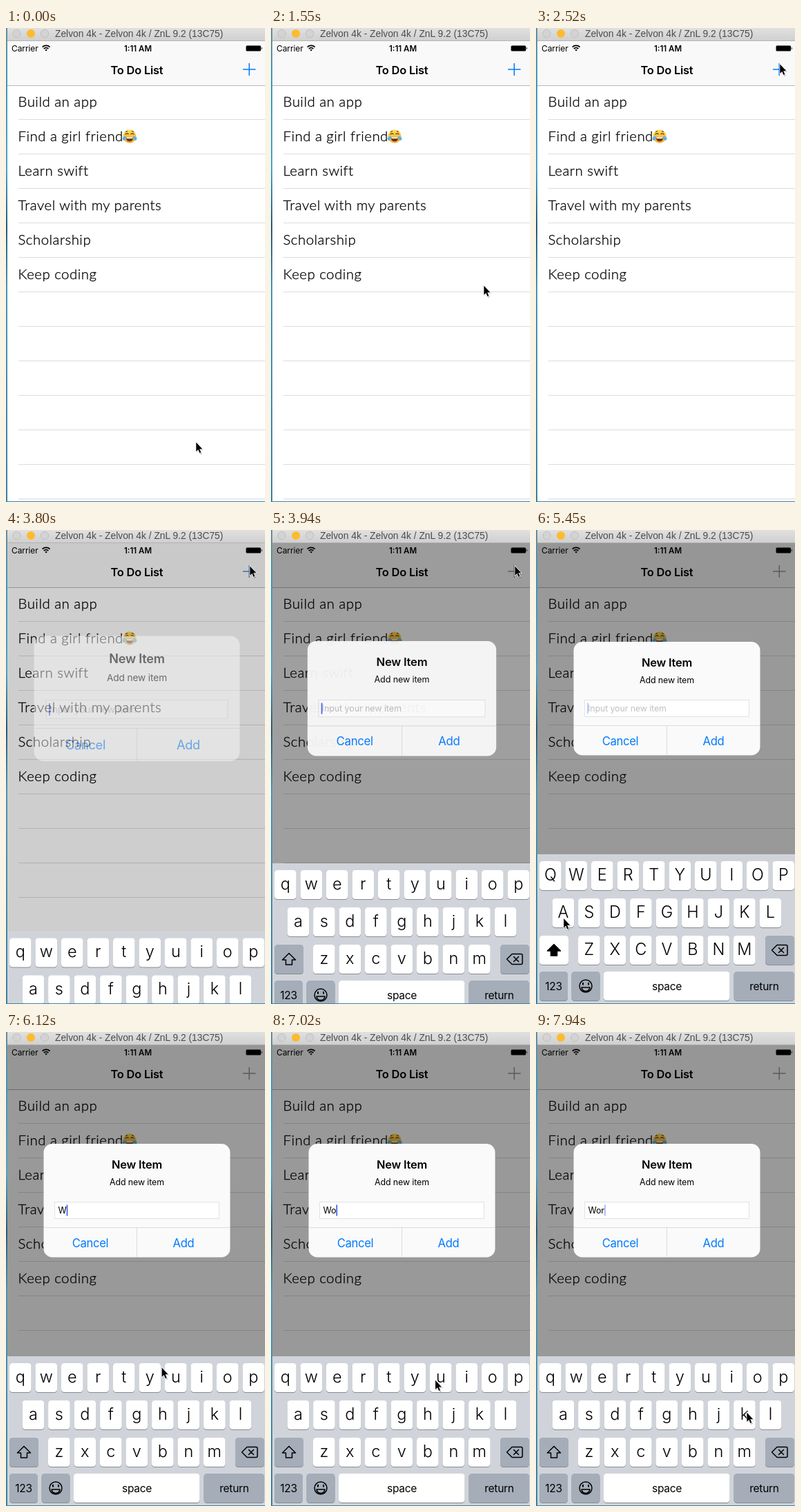
Recreate the animation shown at these times as an HTML page. Size 375x687 px, loop 8000 ms.

```html
<!DOCTYPE html>
<html lang="en">
<head>
<meta charset="utf-8">
<title>To Do List</title>
<style>
html, body { margin: 0; width: 100%; height: 100%; overflow: hidden; background: #fff; }
svg { display: block; width: 375px; height: 687px; }
text { font-family: Inter, "Liberation Sans", sans-serif; white-space: pre; }
.mid { text-anchor: middle; }
.bar { font: 13.8px "Liberation Sans", Arial, sans-serif; fill: #4c4c4c; }
.row { font: 300 20.4px Lato, sans-serif; letter-spacing: .5px; stroke: #000; stroke-width: .3px; }
.head { font-size: 16.4px; font-weight: 600; letter-spacing: -.2px; }
.small { font-size: 12.4px; letter-spacing: -.1px; }
.btn { font-size: 16.6px; letter-spacing: -.3px; fill: #007aff; }
.key { font-size: 23.5px; font-weight: 300; }
.fn { font-size: 15.5px; letter-spacing: -.3px; }
.line { fill: none; stroke: #000; stroke-width: 1.5; stroke-linejoin: round; stroke-linecap: round; }
</style>
</head>
<body>
<svg id="stage" viewBox="0 0 375 687">
  <defs>
    <linearGradient id="sea" x1="0" y1="0" x2="0" y2="1">
      <stop offset="0" stop-color="#6d8b9e"/><stop offset=".12" stop-color="#3f9cba"/>
      <stop offset=".3" stop-color="#4aa6c4"/><stop offset=".42" stop-color="#2c5d76"/>
      <stop offset=".55" stop-color="#4b98b2"/><stop offset="1" stop-color="#3f83a0"/>
    </linearGradient>
    <linearGradient id="chrome" x1="0" y1="0" x2="0" y2="1">
      <stop offset="0" stop-color="#e0e0e0"/><stop offset="1" stop-color="#cfcfcf"/>
    </linearGradient>
    <linearGradient id="face" x1="0" y1="0" x2="0" y2="1">
      <stop offset="0" stop-color="#ffdf55"/><stop offset="1" stop-color="#f2a62c"/>
    </linearGradient>
    <clipPath id="screen"><rect x="2" y="19" width="373" height="667"/></clipPath>
  </defs>
  <rect width="375" height="687" fill="url(#sea)"/>
  <rect x="2" width="373" height="19" fill="url(#chrome)"/>
  <rect x="2" y="18" width="373" height="1" fill="#b4b4b4"/>
  <g stroke="#bfbfbf" fill="#d3d3d3"><circle cx="15.500" cy="8" r="5.700"/><circle cx="56" cy="8" r="5.700"/></g>
  <circle cx="36" cy="8" r="6" fill="#fdbb2d"/>
  <text class="bar" x="71" y="13">Zelvon 4k - Zelvon 4k / ZnL 9.2 (13C75)</text>

  <g clip-path="url(#screen)">
    <rect x="2" y="19" width="373" height="667" fill="#fff"/>
    <rect x="2" y="19" width="373" height="64" fill="#f9f9f9"/>
    <rect x="2" y="83" width="373" height="1" fill="#b9b9bb"/>
    <text class="small" x="8" y="33.500" style="font-size:12px">Carrier</text>
    <g fill="none" stroke="#000" stroke-width="1.700">
      <path d="M52.600 27.600a8 8 0 0 1 11 0M54.800 30a5 5 0 0 1 6.600 0"/>
      <path d="M56.300 31.700a2.800 2.800 0 0 1 3.600 0L58.100 33.600z" fill="#000" stroke="none"/>
    </g>
    <text class="mid" x="191" y="33.500" style="font-size:11.500px;font-weight:600">1:11 AM</text>
    <rect x="347.500" y="25.500" width="21.500" height="8" rx="1.500"/>
    <path d="M369.800 27.500q2 2 0 4z"/>
    <text class="head mid" x="189.500" y="67">To Do List</text>
    <path id="plus" d="M343 60h18.500M352.200 51v18" stroke-width="1.500"/>
    <g id="rows"></g>
    <g transform="translate(179 157)">
      <circle r="9.700" fill="url(#face)"/>
      <path d="M-5.500 1h11q-.5 6.500-5.500 6.500t-5.500-6.500z" fill="#6b3410"/>
      <path d="M-4.900 1.300h9.800l-.5 2h-8.800z" fill="#fff"/>
      <path d="M-6.500-2.500q2.500-3 5-.5M6.500-2.500q-2.500-3-5-.5M-6-6.500l3-1M6-6.500l-3-1" fill="none" stroke="#6b3410" stroke-width="1.100"/>
      <path d="M-5.500-.5q-5.500 1-5 4.500 1.500 3.500 4 1 1.500-2 1-5.500zM5.500-.5q5.500 1 5 4.500-1.500 3.500-4 1-1.500-2-1-5.500z" fill="#58b4ea"/>
    </g>
    <rect id="dim" x="2" y="19" width="373" height="667"/>

    <g id="alert">
      <rect x="54.500" y="162" width="270" height="164.500" rx="12.500" fill="#fafafa"/>
      <text class="head mid" x="189.500" y="198">New Item</text>
      <text class="small mid" x="189.500" y="221.500">Add new item</text>
      <rect x="70.500" y="246.500" width="238" height="24" fill="#fff" stroke="#e2e2e2"/>
      <text id="hint" class="small" x="75" y="263" fill="#c0c0c5">Input your new item</text>
      <text id="typed" class="small" x="75.500" y="263"></text>
      <rect id="caret" y="250.500" width="1.800" height="16" fill="#4668e8"/>
      <path d="M54.500 283.500h270M189.500 283.500v43" stroke="#dcdcde"/>
      <text class="btn mid" x="122" y="311.500">Cancel</text>
      <text class="btn mid" x="257" y="311.500">Add</text>
    </g>

    <g id="board"></g>
  </g>
  <g id="mouse">
    <path d="M1 2V15L4 12.500 6.500 18 9 17 6.500 11.500H11.500z" opacity=".25"/>
    <path d="M.3.500V13.800L3.300 11 5.400 15.900 7.300 15.100 5.200 10.200H9.300z" stroke="#fff" stroke-width="1.400" paint-order="stroke"/>
  </g>
</svg>
<script>
const LOOP = 8000;
const $ = id => document.getElementById(id);
const NS = 'http://www.w3.org/2000/svg';

function add(parent, tag, attrs, text) {
  const el = document.createElementNS(NS, tag);
  for (const k in attrs) el.setAttribute(k, attrs[k]);
  if (text) el.textContent = text;
  return parent.appendChild(el);
}

// list
const items = ['Build an app', 'Find a girl friend', 'Learn swift',
  'Travel with my parents', 'Scholarship', 'Keep coding'];
for (let i = 0; i < 12; i++) {
  if (items[i]) add($('rows'), 'text', { class: 'row', x: 17.5, y: 114 + 50 * i }, items[i]);
  add($('rows'), 'rect', { x: 18, y: 132 + 50 * i, width: 357, height: 1, fill: '#dcdbdf' });
}

// keyboard
const board = $('board');
const keys = {};
add(board, 'rect', { x: 2, y: 470, width: 373, height: 217, fill: '#d0d4da' });

function cap(x, y, w, fill) {
  add(board, 'rect', { x, y: y + 1, width: w, height: 42, rx: 4.5, fill: '#888b90' });
  return add(board, 'rect', { x, y, width: w, height: 42, rx: 4.5, fill });
}
[['qwertyuiop', 5, 480], ['asdfghjkl', 23.6, 534], ['zxcvbnm', 61, 588]].forEach(([row, x0, y]) => {
  [...row].forEach((ch, i) => {
    const x = x0 + 37.5 * i;
    cap(x, y, 31.6, '#fff');
    const label = add(board, 'text', { class: 'key mid', x: x + 15.8, y: y + 28 }, ch);
    keys[ch] = { x: x + 15.8, y, label };
  });
});
const GREY = '#a4adb8';
const shift = cap(5, 588, 42, GREY);
const arrow = add(board, 'path', { class: 'line', d: 'M26 600.500L35.500 610H30.500V617H21.500V610H16.500z' });
cap(332, 588, 42, GREY);
add(board, 'path', { class: 'line', d: 'M341.500 609L349 601.500H362Q364 601.500 364 603.500V614.500Q364 616.500 362 616.500H349zM351.500 605.500l7 7m0-7l-7 7' });
cap(5, 640, 41, GREY);
cap(51.5, 640, 41, GREY);
cap(98, 640, 182.5, '#fff');
cap(286.5, 640, 87.5, GREY);
[['123', 25.5], ['space', 189.5], ['return', 330.5]].forEach(([s, x]) =>
  add(board, 'text', { class: 'fn mid', x, y: 666.5 }, s));
add(board, 'circle', { class: 'line', cx: 72, cy: 661, r: 9 });
add(board, 'path', { class: 'line', d: 'M66 663h12q-1 5.500-6 5.500t-6-5.500z' });
add(board, 'path', { d: 'M68 656v3.500M76 656v3.500', stroke: '#000', 'stroke-width': 2 });

// enlarged key shown while pressed
const pop = add(board, 'g', {});
add(pop, 'path', { fill: '#fff', d: 'M-22-52H22Q28-52 28-46V-16C28-6 15.800-8 15.800 4V42H-15.800V4C-15.800-8-28-6-28-16V-46Q-28-52-22-52z' });
const popLabel = add(pop, 'text', { class: 'mid', y: -17, 'font-size': 35, 'font-weight': 300 });

// pointer: time, x, y
const path = [
  [1410, 275, 600], [1550, 308, 373], [1730, 308, 373], [1870, 302, 112],
  [2050, 302, 112], [2200, 312, 76], [2330, 334, 50], [2520, 353, 52],
  [4020, 353, 52], [4180, 238, 300], [4340, 131, 502], [4380, 131, 502], [4400, 121, 503],
  [4530, 121, 503], [4650, 48, 570], [4800, 35, 595], [4940, 31.5, 602],
  [5330, 31.5, 602], [5640, 53, 501], [6000, 53, 501],
  [6120, 225, 486], [6280, 290, 494], [6510, 311, 501],
  [6860, 311, 501], [7060, 220, 505], [7260, 128, 504],
  [7530, 128, 504], [7720, 230, 530], [7940, 305, 551]
];
// key presses: letter, down, up
const taps = [['w', 5700, 5800], ['o', 6720, 6830], ['r', 7290, 7390]];
const SHOW = 3722, SHIFT_ON = 5230;

const mix = (a, b, k) => a + (b - a) * k;
const clamp = v => Math.max(0, Math.min(1, v));

function pointer(t) {
  if (t <= path[0][0]) return path[0].slice(1);
  for (let i = 1; i < path.length; i++) {
    const [t1, x1, y1] = path[i];
    if (t < t1) {
      const [t0, x0, y0] = path[i - 1], k = (t - t0) / (t1 - t0);
      return [mix(x0, x1, k), mix(y0, y1, k)];
    }
  }
  return path[path.length - 1].slice(1);
}

// critically damped spring
function spring(ms) {
  const u = Math.max(0, ms) * 0.0206;
  return ms > 620 ? 1 : 1 - (1 + u) * Math.exp(-u);
}

function blink(ms) {
  const u = ms % 1150;
  return u < 950 ? 1 - clamp((u - 450) / 200) : clamp((u - 950) / 200);
}

function draw(t) {
  const p = spring(t - SHOW);
  $('dim').setAttribute('opacity', 0.4 * p);
  const plus = $('plus');
  plus.setAttribute('stroke', `rgb(${mix(0, 150, p)},${mix(122, 150, p)},${mix(255, 150, p)})`);
  plus.setAttribute('opacity', t > 3570 && t < 3700 ? 0.3 : 1);

  const s = mix(1.2, 1, p);
  $('alert').setAttribute('opacity', p);
  $('alert').setAttribute('transform', `translate(189.5 244.5) scale(${s}) translate(-189.5 -244.5)`);
  board.setAttribute('transform', `translate(0 ${216 * (1 - p)})`);

  let word = '', last = SHOW, held = null;
  for (const [ch, down, up] of taps) {
    if (t >= up) { word += word ? ch : ch.toUpperCase(); last = up; }
    else if (t >= down) held = ch;
  }
  const typed = $('typed');
  typed.textContent = word;
  $('hint').setAttribute('visibility', word ? 'hidden' : 'inherit');
  const caret = $('caret');
  caret.setAttribute('x', word ? 75.5 + typed.getComputedTextLength() : 74);
  caret.setAttribute('opacity', blink(Math.max(0, t - last)));

  const upper = t >= SHIFT_ON && t < taps[0][2];
  for (const ch in keys) keys[ch].label.textContent = upper ? ch.toUpperCase() : ch;
  shift.setAttribute('fill', upper ? '#fff' : GREY);
  arrow.style.fill = upper ? '#000' : 'none';

  pop.setAttribute('visibility', held ? 'visible' : 'hidden');
  if (held) {
    pop.setAttribute('transform', `translate(${keys[held].x} ${keys[held].y})`);
    popLabel.textContent = upper ? held.toUpperCase() : held;
  }
  const [x, y] = pointer(t);
  $('mouse').setAttribute('transform', `translate(${x} ${y})`);
}

function tick() {
  draw(performance.now() % LOOP);
  requestAnimationFrame(tick);
}
tick();
</script>
</body>
</html>
```
